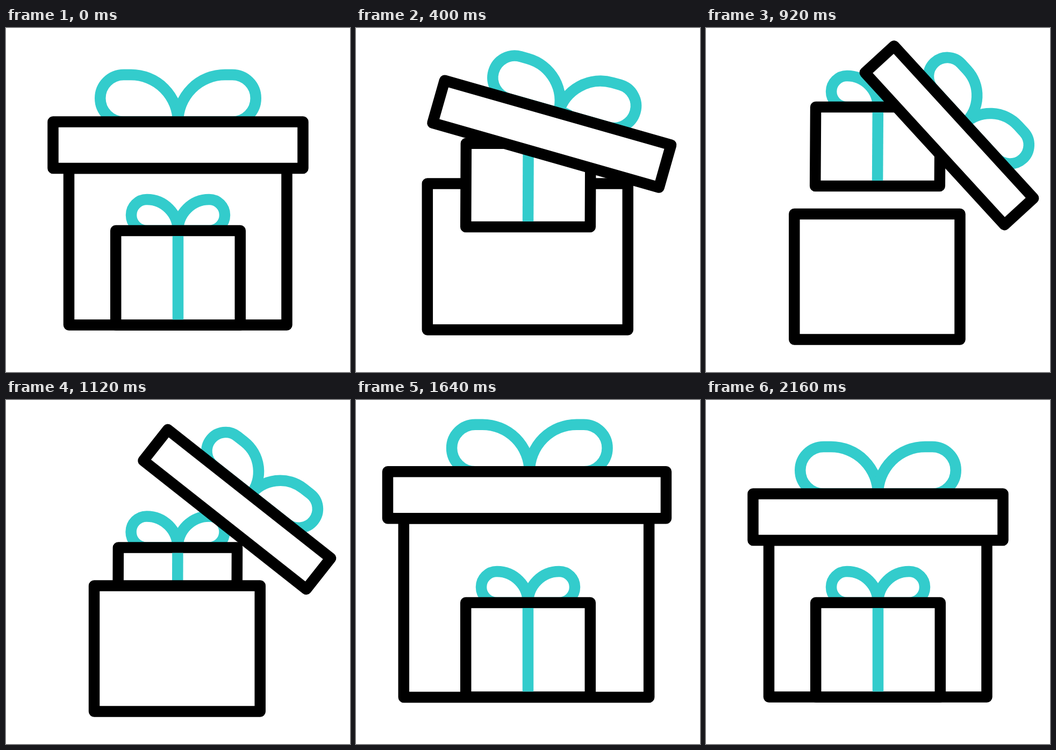
An HTML page with a canvas that plays this animation: 640x640 px, repeating every 2.4 s.

```html
<!DOCTYPE html>
<html>
<head>
<meta charset="utf-8">
<style>
html, body { margin: 0; width: 100%; height: 100%; overflow: hidden; background: #fff; }
canvas { display: block; width: 100vmin; height: 100vmin; }
</style>
</head>
<body>
<canvas id="stage" width="640" height="640"></canvas>
<script>
const ctx = document.getElementById('stage').getContext('2d');
const TEAL = '#33cccc', BLACK = '#000', LOOP = 2400, STEP = 40;

// Smooth progress from 0 to 1 between two times.
function ease(t, start, end) {
  const x = Math.min(1, Math.max(0, (t - start) / (end - start)));
  return x * x * (3 - 2 * x);
}

// Blends a value from rest to its open pose, on to its landing pose, and back to rest.
function blender(opening, landing, settling) {
  return (rest, open, landed) =>
    rest + opening * (open - rest) + landing * (landed - open) + settling * (rest - landed);
}

function stroke(color) {
  ctx.strokeStyle = color;
  ctx.stroke();
}

function box(x, y, w, h) {
  ctx.beginPath();
  ctx.rect(x, y, w, h);
  ctx.fill();
  stroke(BLACK);
}

// Two loops of height r meeting at (x, y), with a flat part on top of each.
function bow(x, y, r, flat) {
  for (const side of [-1, 1]) {
    ctx.save();
    ctx.translate(x, y);
    ctx.scale(side, 1);
    ctx.beginPath();
    ctx.arc(r, 0, r, Math.PI, Math.PI * 1.5);
    ctx.arc(r + flat, -r / 2, r / 2, -Math.PI / 2, Math.PI / 2);
    ctx.closePath();
    ctx.restore();
    stroke(TEAL);
  }
}

function drawSmall(t, x) {
  const rise = ease(t, 120, 557), fall = ease(t, 966, 1320);
  const blend = blender(rise, fall, ease(t, 1320, 1560));
  const h = blend(175.5, 147, 95), half = 115.8 - blend(0, 0, 13);
  ctx.save();
  ctx.translate(x, blend(377, 147, 463) + h);
  ctx.transform(1, 0, -.006 * (rise - fall), 1, 0, 0);
  bow(0, -h, 58, 0);
  box(-half, -h, 2 * half, h);
  ctx.beginPath();
  ctx.moveTo(0, -h + 10);
  ctx.lineTo(0, -10);
  stroke(TEAL);
  ctx.restore();
}

function draw(t) {
  const opening = ease(t, 210, 700), settling = ease(t, 1600, 2000);
  const timed = (start, end) => blender(opening, ease(t, start, end), settling);
  const body = timed(1110, 1395), size = timed(1100, 1370);
  const slide = timed(1000, 1460), turn = timed(996, 1435);
  ctx.fillStyle = '#fff';
  ctx.fillRect(0, 0, 640, 640);
  ctx.lineWidth = 20.5;
  ctx.lineJoin = 'round';

  // The small box leaves in front of the large one and drops in behind it.
  const behind = t >= 720 && t < 1240;
  if (behind) drawSmall(t, 319);
  const left = body(117, 164.3, 88), top = body(261, 346, 219);
  box(left, top, body(522.5, 472.5, 545.8) - left, body(552.5, 579.5, 553) - top);
  if (!behind) drawSmall(t, 320);

  // The lid rides on the body and swings clear of its right corner.
  const w = size(465, 384, 519.5), h = size(86.5, 73.3, 87);
  const lift = Math.sin(slide(0, 1, 0) * Math.PI / 2) ** 1.1;
  ctx.save();
  ctx.translate(slide(320, 452.5, 317.9), top - h / 2 - 109.5 * lift);
  ctx.rotate(turn(0, 47.5, 0) * Math.PI / 180);
  bow(body(0, 3, 5), -h / 2, size(87.5, 70, 87.5), size(13.5, 16.5, 13.5));
  box(-w / 2, -h / 2, w, h);
  ctx.restore();
}

function tick() {
  const t = performance.now() % LOOP;
  draw(Math.floor(t / STEP) * STEP);
  requestAnimationFrame(tick);
}
tick();
</script>
</body>
</html>
```
